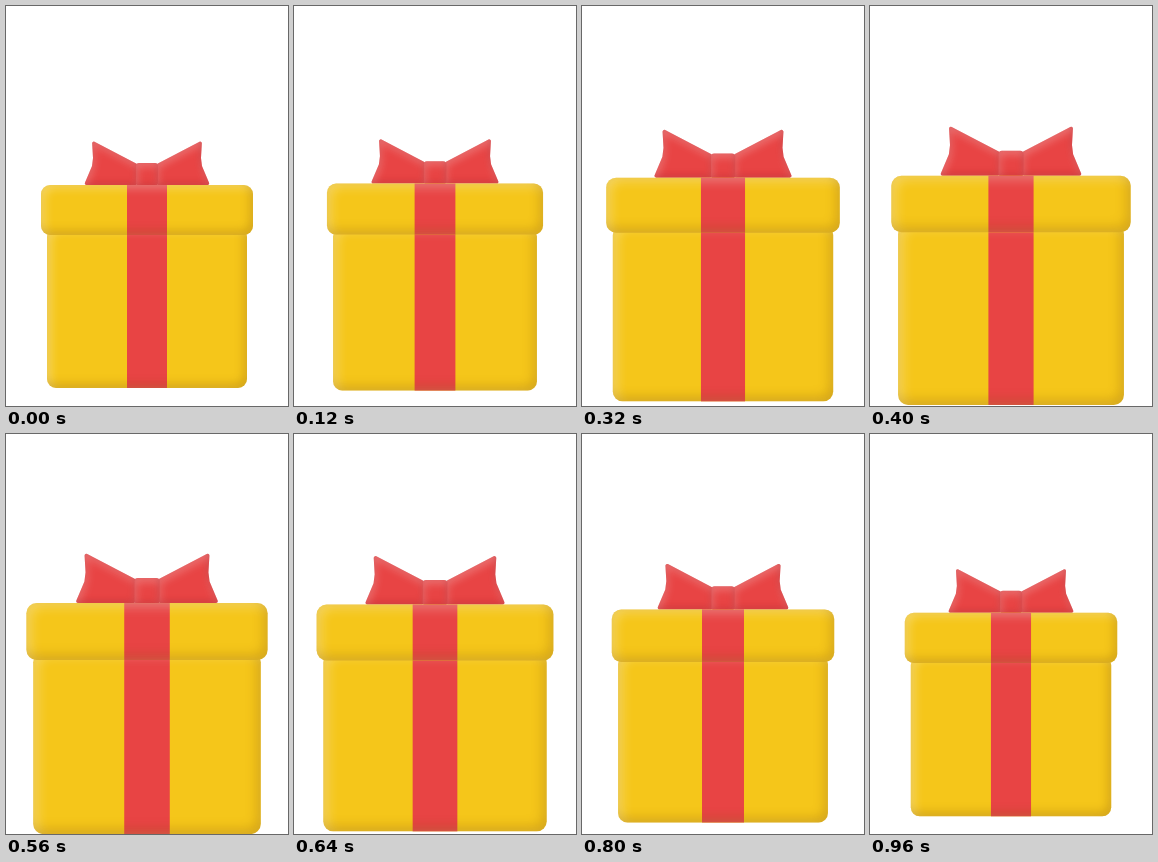
An HTML page with a canvas that plays this animation: 282x400 px, repeating every 1000 ms.

```html
<!DOCTYPE html>
<html lang="en">
<head>
<meta charset="utf-8">
<title>Gift box</title>
<style>
  html, body { margin: 0; width: 100%; height: 100%; overflow: hidden; background: #fff; }
  canvas { display: block; width: 282px; height: 400px; }
</style>
</head>
<body>
<canvas id="stage"></canvas>
<script>
const W = 282, H = 400, LOOP = 1000, STEP = 40, GROW = 0.143;
const CX = 141, CY = 251, FAR = 2000;
const YELLOW = '#f5c61a', RED = '#e84444';
const canvas = document.getElementById('stage');
const ctx = canvas.getContext('2d');
const dpr = window.devicePixelRatio || 1;
canvas.width = W * dpr;
canvas.height = H * dpr;

function rounded(x, y, w, h, r) {
  const p = new Path2D();
  p.roundRect(x, y, w, h, r);
  return p;
}

// Closed polygon with softened corners
function soft(points, r) {
  const p = new Path2D();
  const n = points.length, a = points[0], z = points[n - 1];
  p.moveTo((a[0] + z[0]) / 2, (a[1] + z[1]) / 2);
  points.forEach((q, i) => {
    const next = points[(i + 1) % n];
    p.arcTo(q[0], q[1], next[0], next[1], r);
  });
  p.closePath();
  return p;
}

const box = rounded(41, 222, 200, 160, 9);
const lid = rounded(35, 179, 212, 50, 9);
const knot = rounded(130, 157, 22, 23, 3);
const wing = [[86, 134.5], [131, 158], [131, 179], [78, 179], [86, 160], [87, 152]];
const leftWing = soft(wing, 1.6);
const rightWing = soft(wing.map(([x, y]) => [2 * CX - x, y]), 1.6);

// Shadow cast inward from the edge of a shape
function inset(path, color, dx, dy, blur, k) {
  const ring = new Path2D();
  ring.rect(-200, -200, W + 400, H + 400);
  ring.addPath(path);
  ctx.save();
  ctx.clip(path);
  ctx.translate(-FAR, 0);
  ctx.shadowColor = color;
  ctx.shadowBlur = blur * k;
  ctx.shadowOffsetX = (FAR + dx) * k;
  ctx.shadowOffsetY = dy * k;
  ctx.fill(ring, 'evenodd');
  ctx.restore();
}

function fill(path, color) {
  ctx.fillStyle = color;
  ctx.fill(path);
}

function panel(path, y, h, k) {
  fill(path, YELLOW);
  ctx.fillStyle = RED;
  ctx.fillRect(121, y, 40, h);
  inset(path, 'rgba(255,255,255,.32)', 4, 3, 10, k);
  inset(path, 'rgba(130,80,0,.28)', -3, -4, 10, k);
}

function ribbon(path, k) {
  fill(path, RED);
  inset(path, 'rgba(255,255,255,.28)', 1, 3, 8, k);
  inset(path, 'rgba(140,10,20,.28)', -1, -2, 6, k);
}

function draw(now) {
  const t = Math.floor((now % LOOP) / STEP) * STEP / LOOP;
  const s = 1 + GROW * (1 - Math.cos(2 * Math.PI * t)) / 2;
  const k = s * dpr;
  ctx.setTransform(dpr, 0, 0, dpr, 0, 0);
  ctx.fillStyle = '#fff';
  ctx.fillRect(0, 0, W, H);
  ctx.translate(CX, CY);
  ctx.scale(s, s);
  ctx.translate(-CX, -CY);
  ribbon(leftWing, k);
  ribbon(rightWing, k);
  ribbon(knot, k);
  panel(box, 222, 160, k);
  panel(lid, 179, 50, k);
}

const start = performance.now();
function tick() {
  draw(performance.now() - start);
  requestAnimationFrame(tick);
}
tick();
</script>
</body>
</html>
```
